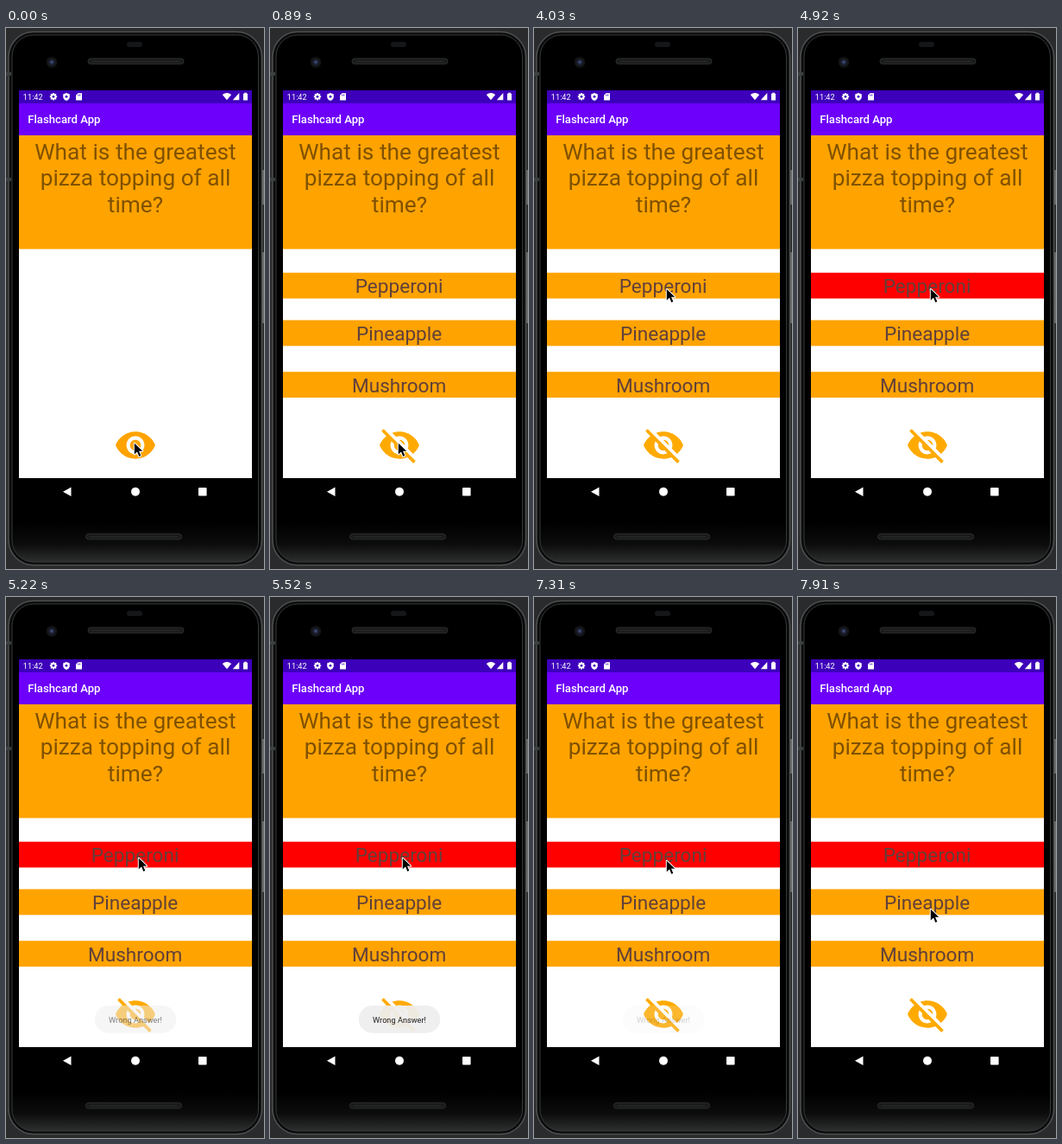
Write an HTML page with a canvas that moves like this. It is 299 px wide and 625 px high and loops after 8000 ms.

```html
<!DOCTYPE html>
<html lang="en">
<head>
<meta charset="utf-8">
<title>Flashcard App</title>
<style>
  html, body { margin: 0; width: 100%; height: 100%; overflow: hidden; background: #2a2b2c; }
  canvas { display: block; width: 299px; height: 625px; }
</style>
</head>
<body>
<canvas id="stage" width="299" height="625"></canvas>
<script>
const ctx = document.getElementById('stage').getContext('2d');
const LOOP = 8000;
const ORANGE = '#ffa300';
const CARD_TEXT = 'rgba(0,0,0,.5)';
const ANSWER_TEXT = '#60403a';

// Screen states: each entry holds from its time until the next one.
const pointer = [
  [0, 148, 478], [3440, 143, 453], [3590, 143, 362], [3740, 151, 310],
  [3880, 153, 301], [4030, 153, 300], [7310, 153, 303], [7460, 154, 326],
  [7610, 154, 345], [7760, 153.5, 357], [7910, 153, 359]
];
const toastFade = [
  [0, 0], [5070, .2], [5220, .55], [5370, .85], [5520, 1],
  [7020, .85], [7170, .5], [7310, .2], [7460, 0]
];
const REVEAL = 890, PICK = 4920;

const answers = [['Pepperoni', 282.7], ['Pineapple', 337.5], ['Mushroom', 397.2]];

const eyeOpen = new Path2D('M12 4.5C7 4.5 2.73 7.61 1 12c1.73 4.39 6 7.5 11 7.5s9.27-3.11 11-7.5c-1.73-4.39-6-7.5-11-7.5zM12 17c-2.76 0-5-2.24-5-5s2.24-5 5-5 5 2.24 5 5-2.24 5-5 5zm0-8c-1.66 0-3 1.34-3 3s1.34 3 3 3 3-1.34 3-3-1.34-3-3-3z');
const eyeOff = new Path2D('M12 7c2.76 0 5 2.24 5 5 0 .65-.13 1.26-.36 1.83l2.92 2.92c1.51-1.26 2.7-2.89 3.43-4.75-1.73-4.39-6-7.5-11-7.5-1.4 0-2.74.25-3.98.7l2.16 2.16C10.74 7.13 11.35 7 12 7zM2 4.27l2.74 2.74C3.08 8.3 1.78 10.02 1 12c1.73 4.39 6 7.5 11 7.5 1.55 0 3.03-.3 4.38-.84L19.73 22 21 20.73 3.27 3 2 4.27zM7.53 9.8l1.55 1.55c-.05.21-.08.43-.08.65 0 1.66 1.34 3 3 3 .22 0 .44-.03.65-.08l1.55 1.55c-.67.33-1.41.53-2.2.53-2.76 0-5-2.24-5-5 0-.79.2-1.53.53-2.2zm4.31-.78l3.15 3.15.02-.16c0-1.66-1.34-3-3-3l-.17.01z');
const arrow = new Path2D('M.8 1.8V14.6L4 11.6 6.3 17 8.3 16.1 6 10.8H10.2Z');

const held = (steps, t) => steps.filter(s => s[0] <= t).pop();

function rect(x, y, w, h, fill) {
  ctx.fillStyle = fill;
  ctx.fillRect(x, y, w, h);
}

function round(x, y, w, h, r, fill, stroke, line = 1) {
  ctx.beginPath();
  ctx.roundRect(x, y, w, h, r);
  if (fill) { ctx.fillStyle = fill; ctx.fill(); }
  if (stroke) { ctx.strokeStyle = stroke; ctx.lineWidth = line; ctx.stroke(); }
}

function disc(x, y, r, fill) {
  ctx.beginPath();
  ctx.arc(x, y, r, 0, Math.PI * 2);
  ctx.fillStyle = fill;
  ctx.fill();
}

function shape(d, fill) {
  ctx.fillStyle = fill;
  ctx.fill(new Path2D(d));
}

function text(s, x, y, size, fill, align = 'center', weight = 400) {
  ctx.font = `${weight} ${size}px Roboto, sans-serif`;
  ctx.textAlign = align;
  ctx.fillStyle = fill;
  ctx.fillText(s, x, y);
}

function grille(x, y, w, h) {
  round(x, y, w, h, h / 2, '#191a1a', '#2d2e2f');
  rect(x + 4, y + h / 2 - .5, w - 8, 1.5, '#262728');
}

function bodyShade() {
  const g = ctx.createLinearGradient(0, 572, 0, 621);
  g.addColorStop(0, '#000');
  g.addColorStop(.5, '#0c0c0c');
  g.addColorStop(1, '#343535');
  return g;
}

function drawPhone() {
  rect(0, 0, 299, 625, '#2a2b2c');
  rect(296, 164, 3, 40, '#6c6d6e');
  rect(296, 259, 3, 82, '#6c6d6e');
  round(3, 4.5, 293.5, 616, 29, '#0b0b0b', '#4e5051', 1.5);
  for (const y of [51, 173]) rect(0, y, 6, 4, '#3d4042');
  round(7, 8, 285.5, 609, 25, bodyShade(), '#363839');
  round(140, 16, 18, 6, 3, '#141618');
  grille(95, 35.2, 111, 6.5);
  grille(92.5, 584.3, 111, 6.5);
  disc(53, 39.5, 6.3, '#131416');
  disc(53, 39.5, 3.6, '#20243a');
  disc(53, 39.5, 1.4, '#454f7c');
}

function drawStatusBar() {
  rect(15, 72, 270, 15, '#3d00ba');
  text('11:42', 19.8, 82.7, 9.2, '#fff', 'left');

  for (let i = 0; i < 4; i++) {
    ctx.save();
    ctx.translate(55, 79.3);
    ctx.rotate(i * Math.PI / 4);
    rect(-.9, -4.2, 1.8, 8.4, '#fff');
    ctx.restore();
  }
  disc(55, 79.3, 3.2, '#fff');
  disc(55, 79.3, 1.4, '#3d00ba');

  shape('M70 75l3.8 1.5v2.7q0 3.4-3.8 4.8q-3.8-1.4-3.8-4.8v-2.7z', '#fff');
  disc(70, 79.3, 1.4, '#3d00ba');
  shape('M83.5 75.3H88V83.5H81V77.8z', '#fff');
  rect(83.4, 76.7, .9, 1.8, '#3d00ba');
  rect(85.3, 76.7, .9, 1.8, '#3d00ba');

  shape('M256 83.3L250.8 77Q256 72.8 261.2 77z', '#fff');
  shape('M262.8 83.2L270.3 75V83.2z', '#fff');
  shape('M275 75.8H276.2V74.8H278.8V75.8H280V83.4H275z', '#fff');
}

function drawAppBars() {
  rect(15, 87, 270, 37, '#6c00fa');
  text('Flashcard App', 25.3, 110.4, 13.14, '#fff', 'left', 500);
  rect(15, 520, 270, 31, '#000');
  shape('M66 535.8L75.5 530.6V541z', '#fff');
  disc(150, 535.8, 5, '#fff');
  round(223, 531, 9.6, 9.6, 1, '#fff');
}

function drawCard() {
  rect(15, 124, 270, 396, '#fff');
  rect(15, 124, 270, 131.4, ORANGE);
  ['What is the greatest', 'pizza topping of all', 'time?'].forEach((line, i) =>
    text(line, 150, 151.7 + i * 30.5, 26.27, CARD_TEXT));
}

function drawAnswers(picked) {
  answers.forEach(([label, y], i) => {
    rect(15, y, 270, 29.8, picked && i === 0 ? '#f00' : ORANGE);
    text(label, 149.6, y + 23.5, 22.6, ANSWER_TEXT);
  });
}

function drawEye(hidden) {
  ctx.save();
  ctx.translate(150 - 12 * 2.09, 482 - 12 * 2.09);
  ctx.scale(2.09, 2.09);
  ctx.fillStyle = hidden ? '#ffaa00' : ORANGE;
  ctx.fill(hidden ? eyeOff : eyeOpen);
  ctx.restore();
}

function drawToast(alpha) {
  if (!alpha) return;
  ctx.globalAlpha = alpha * .94;
  round(102.8, 472, 94.4, 31.7, 15.8, '#eee');
  ctx.globalAlpha = alpha;
  text('Wrong Answer!', 150, 491.6, 9.2, 'rgba(0,0,0,.87)');
  ctx.globalAlpha = 1;
}

function drawPointer(x, y) {
  ctx.save();
  ctx.translate(x, y);
  ctx.lineJoin = 'round';
  ctx.strokeStyle = '#fff';
  ctx.lineWidth = 2;
  ctx.stroke(arrow);
  ctx.fillStyle = '#000';
  ctx.fill(arrow);
  ctx.restore();
}

function draw(t) {
  drawPhone();
  drawStatusBar();
  drawCard();
  drawAppBars();
  const open = t >= REVEAL;
  if (open) drawAnswers(t >= PICK);
  drawEye(open);
  drawToast(held(toastFade, t)[1]);
  const [, x, y] = held(pointer, t);
  drawPointer(x, y);
}

const start = performance.now();
function tick() {
  draw((performance.now() - start) % LOOP);
  requestAnimationFrame(tick);
}
tick();
</script>
</body>
</html>
```
